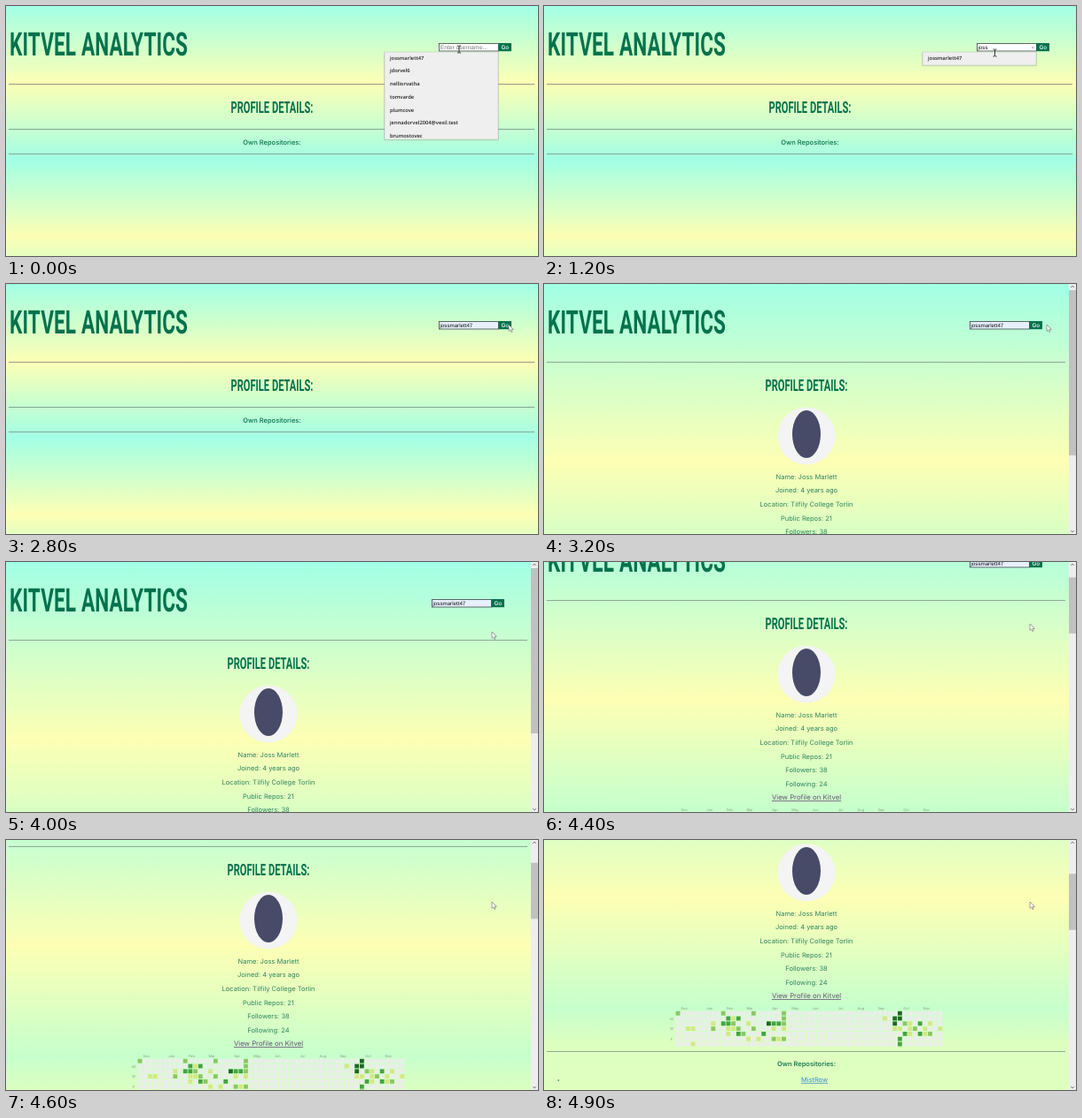
An HTML page that plays this animation: 600 by 283 pixels, repeating every 5000 ms.

```html
<!DOCTYPE html>
<html lang="en">
<head>
<meta charset="utf-8">
<title>Profile analytics</title>
<style>
  html, body { margin: 0; width: 100%; height: 100%; overflow: hidden; }
  svg { display: block; width: 100%; height: 100%; }
  text { font: 7.5px Inter, sans-serif; fill: #04724d; text-rendering: geometricPrecision; }
  .middle { fill: #2f8462; text-anchor: middle; }
  .title { font: 700 36.8px Roboto, sans-serif; letter-spacing: .25px; }
  .subtitle { font: 700 18.2px Roboto, sans-serif; text-anchor: middle; }
  .medium { font-weight: 500; text-anchor: middle; }
  .strong { font-weight: 600; fill: #1f7c58; text-anchor: middle; }
  .visited { font-size: 7.8px; fill: #6a5077; text-decoration: underline; text-anchor: middle; }
  .link { fill: #3f88c8; text-decoration: underline; text-anchor: middle; }
  .hint { font: 6.7px "Liberation Sans", sans-serif; fill: #777; }
  .typed { font: 6.2px "Liberation Sans", sans-serif; fill: #111; }
  .option { font: 600 5.8px "Open Sans", sans-serif; fill: #222; }
  .button { font: 500 6.4px Inter, sans-serif; fill: #fff; text-anchor: middle; }
  .tiny { font: 4px Inter, sans-serif; fill: #8b9a88; text-anchor: middle; }
</style>
</head>
<body>
<svg id="stage" viewBox="0 0 600 283" preserveAspectRatio="none"></svg>
<script>
const LOOP = 5000, STEP = 100;
const HOVER = 1500, SELECT = 1900, LOAD = 3200, GRAPH = 4100, SCROLL = 4150;
const USER = 'jossmarlett47', TYPED = 'joss';
const OPTIONS = [USER, 'jdorvel6', 'nelliorvatha', 'tomvarde', 'plumcove',
  'jennadorvel2004@vexil.test', 'brumostovec'];
const MONTHS = 'Dec Jan Feb Mar Apr May Jun Jul Aug Sep Oct Nov'.split(' ');
const MONTH_WEEKS = [1, 6, 10, 14, 19, 23, 27, 32, 36, 40, 45, 49];
const DETAILS = ['Name: Joss Marlett', 'Joined: 4 years ago',
  'Location: Tilfily College Torlin', 'Public Repos: 21', 'Followers: 38', 'Following: 24'];

// Pointer stops: time, x, y
const POINTER = [
  [0, 511, 49], [1100, 511, 49], [1200, 508.5, 53], [1500, 472, 60], [1700, 465, 59],
  [1900, 465, 59], [2300, 525, 49], [2800, 567, 46], [3300, 567, 46], [3800, 548, 79],
  [4100, 548, 79], [4400, 548, 70], [LOOP, 548, 70]
];

const rect = (x, y, w, h, fill, extra = '') =>
  `<rect x="${x}" y="${y}" width="${w}" height="${h}" fill="${fill}" ${extra}/>`;
const text = (x, y, cls, content) => `<text x="${x}" y="${y}" class="${cls}">${content}</text>`;
const group = (x, y, content) => `<g transform="translate(${x} ${y})">${content}</g>`;
const condensed = (x, y, cls, content) =>
  `<g transform="translate(${x} ${y}) scale(.612 1)">${text(0, 0, cls, content)}</g>`;
const rule = (y, right, color = '#7fa893') => rect(3, y, right - 3, 1, color);

const gradient = (id, height, stops, spread = 'pad') =>
  `<linearGradient id="${id}" gradientUnits="userSpaceOnUse" x1="0" y1="0" x2="0" y2="${height}" spreadMethod="${spread}">` +
  stops.map(([y, color]) => `<stop offset="${y / height}" stop-color="${color}"/>`).join('') +
  '</linearGradient>';

const DEFS = '<defs>' +
  gradient('shortPage', 87, [[0, '#a2ffe5'], [87, '#fdffb4']], 'reflect') +
  gradient('longPage', 420, [[0, '#a2ffe5'], [200, '#fdffb4'], [325, '#c6ffcc'],
    [365, '#dcffc0'], [420, '#dfffbe']]) +
  '<clipPath id="listClip"><rect x="427" y="52" width="128" height="99"/></clipPath></defs>';

function pointerAt(t) {
  const i = Math.max(1, POINTER.findIndex(stop => stop[0] > t));
  const [t0, x0, y0] = POINTER[i - 1], [t1, x1, y1] = POINTER[i];
  const k = (t - t0) / (t1 - t0);
  return [x0 + (x1 - x0) * k, y0 + (y1 - y0) * k];
}

function pointer(t) {
  const [x, y] = pointerAt(t);
  const overInput = t < SELECT + 200 ? y < 54 : x < 555 && y < 52;
  return group(x, y, overInput
    ? '<path d="M-2-4h1.5l.5.5.5-.5H2M0-3.5v7M-2 4h1.5l.5-.5.5.5H2" fill="none" stroke="#222" stroke-width=".9"/>'
    : '<path d="M0 0v7.4l1.7-1.5 1.2 2.6 1.2-.6-1.1-2.5h2.3z" fill="#fff" stroke="#666" stroke-width=".6"/>');
}

function header(t) {
  const letters = Math.min(TYPED.length, t / STEP);
  const value = t < HOVER ? TYPED.slice(0, letters) : USER;
  const filled = t >= HOVER, open = t < SELECT;
  const caret = t >= 100 && t < 800 ? '|' : '';
  const shift = t < LOAD ? 0 : -8;
  return condensed(4, 56, 'title', 'KITVEL ANALYTICS') + group(shift, 0,
    rect(488.5, 42.5, 67, 8.5, filled ? '#e8f0fe' : '#fff', 'stroke="#4d5a57" stroke-width=".9"') +
    (value ? text(489.5, 48.6, 'typed', value + caret) : text(489.8, 48.8, 'hint', 'Enter username...')) +
    (value && open ? text(549.5, 48.5, 'typed', '<tspan fill="#888">×</tspan>') : '') +
    rect(555.3, 42, 14.7, 9.2, '#04724d') + text(562.7, 49, 'button', 'Go'));
}

function dropdown(t) {
  if (t >= SELECT) return '';
  const prefix = TYPED.slice(0, t / STEP);
  const rows = OPTIONS.filter(name => name.startsWith(prefix));
  const height = Math.min(99, rows.length * 15);
  const hover = t >= HOVER ? rect(427, 52, 128, 15, '#dcdcdc') : '';
  return rect(426, 52.5, 130, height + .8, '#000', 'opacity=".13" rx="1"') +
    rect(427, 52, 128, height, '#efefef', 'stroke="#b9c4bd" stroke-width=".5"') + hover +
    '<g clip-path="url(#listClip)">' +
    rows.map((name, i) => text(433, 60.7 + i * 14.72, 'option', name)).join('') + '</g>';
}

function emptyPage() {
  return rect(0, 0, 600, 283, 'url(#shortPage)') + rule(88, 596, '#949c8c') +
    condensed(300, 120.7, 'subtitle', 'PROFILE DETAILS:') + rule(139, 596) +
    text(300, 156.5, 'medium', 'Own Repositories:') + rule(167, 596);
}

function seededRandom(seed) {
  return () => (seed = seed * 16807 % 2147483647) / 2147483647;
}

// Two busy seasons, with a few stray days elsewhere
function activity(week) {
  if (week >= 7 && week <= 15) return .75;
  if (week >= 16 && week <= 21) return .45;
  if (week >= 43 && week <= 50) return .7;
  return week < 5 ? .2 : week > 50 ? .3 : .01;
}

function calendar() {
  const random = seededRandom(4217);
  const greens = ['#d6e685', '#d6e685', '#d6e685', '#8cc665', '#8cc665', '#44a340', '#1e6823'];
  let out = '';
  for (let week = 0; week < 53; week++) {
    for (let day = 0; day < 7; day++) {
      const midweek = 1 - Math.abs(day - 2.7) * .24;
      const busy = random() < activity(week) * midweek;
      const shade = greens[Math.floor(random() * greens.length)];
      out += rect(148.6 + week * 5.69, 328.8 + day * 5.8, 4.8, 4.8, busy ? shade : '#ebedea');
    }
  }
  MONTHS.forEach((name, i) => out += text(152.5 + MONTH_WEEKS[i] * 5.69, 326.6, 'tiny', name));
  ['M', 'W', 'F'].forEach((name, i) => out += text(144, 338.5 + i * 11.6, 'tiny', name));
  return out;
}
const CALENDAR = calendar();

function profilePage(t) {
  const scroll = Math.max(0, (t - SCROLL) * .18);
  const avatar = '<circle cx="296" cy="172" r="32.5" fill="#f3f4f3"/>' +
    '<ellipse cx="296" cy="170" rx="16" ry="27" fill="#474b68"/>';
  const below = t < GRAPH ? '' : CALENDAR + rule(374, 588, '#93ab8d') +
    text(296, 390.8, 'strong', 'Own Repositories:') +
    '<circle cx="16.3" cy="407" r=".8" fill="#04724d"/>' + text(305, 408.9, 'link', 'MistRow');
  return group(0, -scroll,
    rect(0, 0, 600, 420, 'url(#longPage)') + header(t) + rule(88, 588, '#8aab94') +
    condensed(296, 120.7, 'subtitle', 'PROFILE DETAILS:') + avatar +
    DETAILS.map((line, i) => text(296, 220.7 + i * 15.6, 'middle', line)).join('') +
    text(296, 314.2, 'visited', 'View Profile on Kitvel') + below) + scrollbar(t, scroll);
}

function scrollbar(t, scroll) {
  const height = t < GRAPH ? 187 : 63.5;
  return rect(592, 0, 8, 283, '#eeeeee') + rect(592, 7 + scroll * .232, 8, height, '#c1c1c1') +
    '<path d="M594 4l2-2 2 2M594 279l2 2 2-2" fill="none" stroke="#777" stroke-width=".9"/>';
}

const stage = document.getElementById('stage');
const start = performance.now();
let shown = -1;

function draw() {
  const elapsed = (performance.now() - start) % LOOP;
  const t = Math.floor(elapsed / STEP) * STEP;
  if (t !== shown) {
    shown = t;
    const page = t < LOAD ? emptyPage() + header(t) + dropdown(t) : profilePage(t);
    stage.innerHTML = DEFS + page + pointer(t);
  }
  requestAnimationFrame(draw);
}
draw();
</script>
</body>
</html>
```
